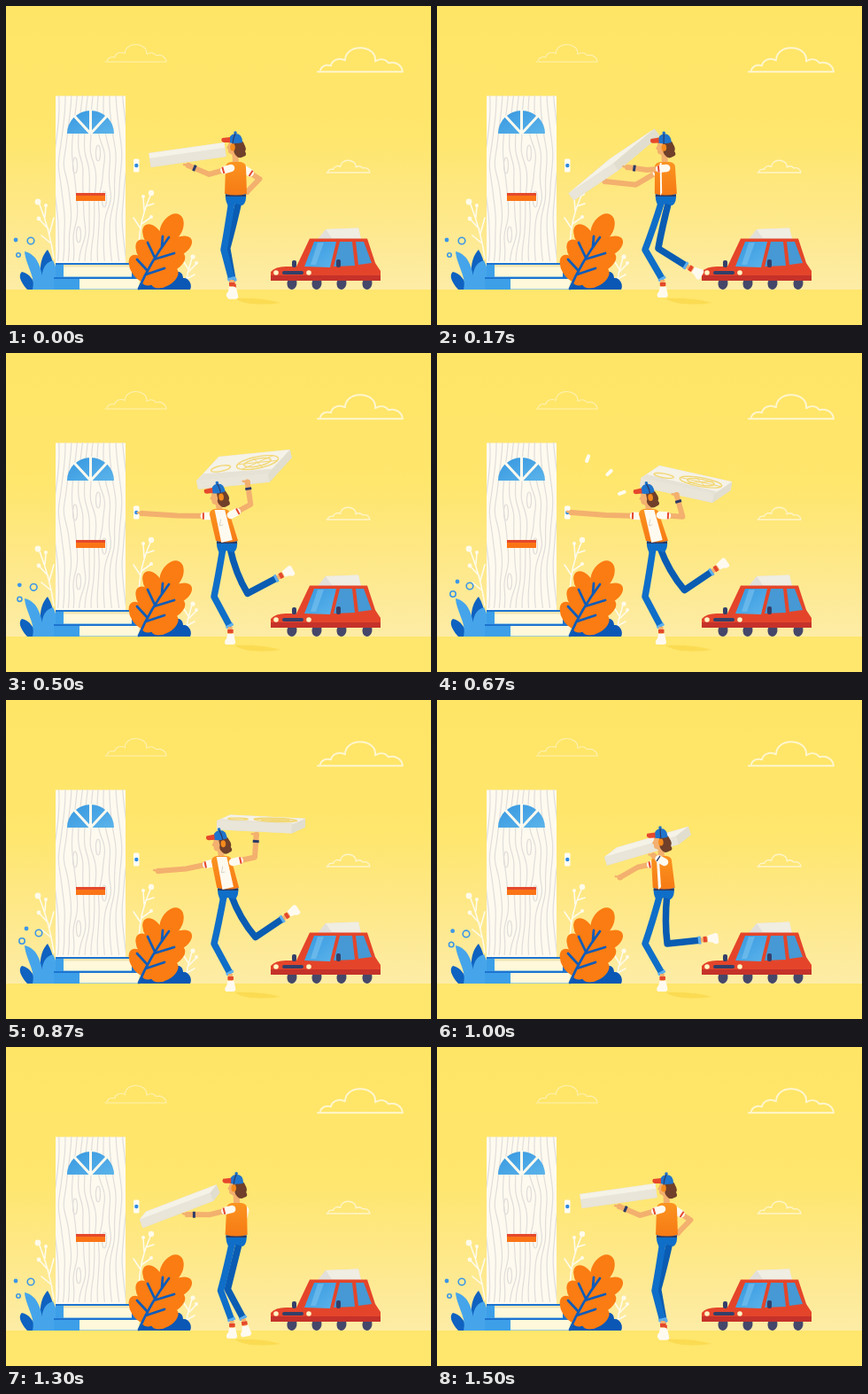
An HTML page that plays this animation: 480x360 px, repeating every 1.53 s.

```html
<!DOCTYPE html>
<html>
<head>
<meta charset="utf-8">
<title>Pizza delivery</title>
<style>
html, body { margin: 0; width: 100%; height: 100%; overflow: hidden; background: #ffe566; }
svg { display: block; width: 480px; height: 360px; }
</style>
</head>
<body>
<svg viewBox="0 0 480 360" xmlns="http://www.w3.org/2000/svg">
  <defs>
    <linearGradient id="sky" x1="0" y1="0" x2="0" y2="1">
      <stop offset="0" stop-color="#ffe566"/>
      <stop offset=".45" stop-color="#ffe66c"/>
      <stop offset=".72" stop-color="#fee887"/>
      <stop offset="1" stop-color="#fdeca6"/>
    </linearGradient>
    <linearGradient id="glass" x1="0" y1="0" x2="1" y2="1">
      <stop offset="0" stop-color="#3697e0"/>
      <stop offset="1" stop-color="#5cb4ea"/>
    </linearGradient>
    <linearGradient id="vest" x1="0" y1="0" x2="0" y2="1">
      <stop offset="0" stop-color="#fb9420"/>
      <stop offset="1" stop-color="#f67a14"/>
    </linearGradient>
    <clipPath id="panel"><rect x="56" y="101" width="79" height="189"/></clipPath>
    <path id="cloud" d="M0 0H96C95 -8 88 -12 80 -10C76 -15 70 -15 65 -12C66 -22 57 -27 48 -27C38 -27 31 -21 31 -13C24 -17 16 -13 15 -7C9 -9 4 -6 3 -2"
      fill="none" stroke="#fff8d8" stroke-linecap="round" stroke-linejoin="round" vector-effect="non-scaling-stroke"/>
  </defs>

  <rect width="480" height="321" fill="url(#sky)"/>
  <rect y="320" width="480" height="40" fill="#ffe66c"/>
  <use href="#cloud" transform="translate(112 63) scale(.72)" stroke-width="1.1" opacity=".65"/>
  <use href="#cloud" transform="translate(352 74.300)" stroke-width="2" opacity=".9"/>
  <use href="#cloud" transform="translate(362 188) scale(.51)" stroke-width="1.3" opacity=".85"/>

  <!-- twigs -->
  <g stroke="#fffbea" stroke-width="1.6" fill="none" stroke-linecap="round">
    <path d="M54 285Q50 255 38 224M48 252L38 241M49 257L54 239M44 238L45 226M51 268L40 259"/>
    <path d="M150 270Q151 240 163 214M153 246L163 239M152 251L144 239M156 231L155 216M158 226L167 223"/>
    <path d="M202 318Q205 300 210 284M205 301L215 291M206 297L201 289M204 308L213 303"/>
  </g>
  <g fill="#fffbea">
    <circle cx="36" cy="221" r="3.4"/><circle cx="45" cy="225" r="2"/><circle cx="37" cy="240" r="2.4"/>
    <circle cx="164" cy="211" r="3.2"/><circle cx="155" cy="215" r="2"/><circle cx="164" cy="238" r="2"/>
    <circle cx="211" cy="283" r="2.6"/><circle cx="215" cy="290" r="2"/>
  </g>

  <!-- door -->
  <rect x="56" y="101.500" width="79" height="189" fill="#fefaef"/>
  <g id="grain" clip-path="url(#panel)" fill="none" stroke="#e0dddb" stroke-width="1.2"/>
  <path d="M69 144a26.500 26 0 0 1 53 0z" fill="url(#glass)"/>
  <path d="M95.500 144L77 124M95.500 144V117M95.500 144L114 124" stroke="#fefaef" stroke-width="3"/>
  <rect x="79" y="211" width="33" height="9" fill="#fb7416"/>
  <rect x="79" y="211" width="33" height="3" fill="#e5482c"/>
  <rect x="144" y="172.500" width="6.500" height="15" rx="1.500" fill="#fffdf4"/>
  <circle cx="147.300" cy="180" r="2.200" fill="#2f8be2"/>

  <!-- shrubs and steps -->
  <path d="M150 320C152 308 180 298 186 305C192 296 200 300 200 307C206 306 211 314 208 320z" fill="#0b57b5"/>
  <path d="M24 320C15 310 14 303 18 300C27 302 31 309 35 320zM44 320C35 300 39 283 47 275C55 288 56 304 52 320z" fill="#0f62c0"/>
  <path d="M30 320C34 306 22 292 21 277C36 280 42 298 42 320zM42 320C38 300 43 290 53 287C60 300 58 312 54 320z" fill="#46a5ea"/>
  <path d="M56 290H150V306H56zM54 306H150V320H54z" fill="#3d9fe8"/>
  <path d="M56 290H150V292H56zM142 292H150V306H142zM54 306H150V308H54z" fill="#1d74d0"/>
  <path d="M65 292H142V305.500H65zM83 308H150V319.500H83z" fill="#fff8da"/>
  <path d="M65 292H142V294.500H65z" fill="#f3e6b4"/>
  <g id="bush" fill="#fa7c12"/>
  <path d="M150 319Q163 289 184 261M160 299L148 286M158 303L179 296M168 284L160 267M167 286L190 279M176 272L177 260" fill="none" stroke="#0f5cb8" stroke-width="2.800" stroke-linecap="round"/>

  <!-- car -->
  <path d="M352 263L361 252L398 250.500L401 263z" fill="#e2dfda"/>
  <path d="M361 252L398 250.500L401 263L368 262z" fill="#f0ede3"/>
  <g id="wheels" fill="#45476a"/>
  <path d="M328 294L343 262.500H408L417 290L423 299V310H299V300Q304 294 316 294z" fill="#e4452a"/>
  <path d="M299 304H423V310H299z" fill="#c5322a"/>
  <path d="M337 294L348 266H373L366 295z" fill="url(#glass)"/>
  <path d="M370 294L377 266H391L394 293zM395 266H404L413 290L398 292z" fill="#4699d4"/>
  <path d="M352 267L344 292H350L359 267z" fill="#7cc3ee" opacity=".6"/>
  <rect x="323" y="287" width="5" height="8" rx="2" fill="#33406a"/>
  <rect x="373" y="286" width="5" height="9" rx="2" fill="#33406a"/>
  <rect x="312" y="299" width="24" height="4" rx="2" fill="#33406a"/>
  <circle cx="305" cy="301" r="2.800" fill="#fff4c4"/><circle cx="342" cy="301" r="2.800" fill="#fff4c4"/>

  <g id="bubbles"/>
  <path d="M258 330Q290 329 310 335Q280 339 264 333z" fill="#f9d94c" opacity=".8"/>
  <g id="rings" stroke="#fffdf0" stroke-width="4" stroke-linecap="round"/>
  <g id="man"/>
</svg>
<script>
const LOOP = 1530;
const TIMES = [0, 170, 370, 670, 870, 1130, 1500, LOOP];
const SKIN = '#f3b06e', WHITE = '#fffaf0', RED = '#e5482c', NAVY = '#2b3b66';
const $ = id => document.getElementById(id);

// one value per key time; each track returns to its first value
const TRACKS = {
  kick: [0, .42, .85, 1, 1, .42],
  turn: [0, .4, 1, 1, 1, 0],
  lean: [0, .1, .75, 1, .8, -.1],
  handX: [272, 190, 157, 152, 172, 240],
  handY: [210, 198, 183, 180, 193, 205],
  bend: [16, 11, 1, 1, 2, -9],
  boxX: [205, 200, 254, 281, 288, 189],
  boxY: [168, 179, 120, 148, 140, 189],
  roll: [-8, -37, -30, 10, 2, -32],
  yaw: [0, 45, 30, 12, 10, 12],
  pitch: [4, 3, 17, 12, 5, 4]
};

// monotone cubic through the keys
function sample(keys, t) {
  const v = [...keys, keys[0], keys[0]], last = TIMES.length - 1;
  let i = 0;
  while (i < last - 1 && t >= TIMES[i + 1]) i++;
  const slope = k => k < 0 || k >= last ? 0 : (v[k + 1] - v[k]) / (TIMES[k + 1] - TIMES[k]);
  const tangent = k => {
    const a = slope(k - 1), b = slope(k);
    return a * b <= 0 ? 0 : 2 * a * b / (a + b);
  };
  const h = TIMES[i + 1] - TIMES[i], p = (t - TIMES[i]) / h, q = 1 - p;
  return v[i] * q * q * (1 + 2 * p) + v[i + 1] * p * p * (3 - 2 * p)
    + h * p * q * (q * tangent(i) - p * tangent(i + 1));
}

const rad = deg => deg * Math.PI / 180;
const ease = (a, b, t) => {
  const p = Math.min(1, Math.max(0, (t - a) / (b - a)));
  return p * p * (3 - 2 * p);
};
const lerp = (a, b, p) => a + (b - a) * p;
const mix = (a, b, p) => [lerp(a[0], b[0], p), lerp(a[1], b[1], p)];
const add = (a, b) => [a[0] + b[0], a[1] + b[1]];
const dist = (a, b) => Math.hypot(b[0] - a[0], b[1] - a[1]) || 1;
const toward = (a, b, d) => mix(a, b, Math.min(1, d / dist(a, b)));
const polar = (p, deg, r) => add(p, [r * Math.sin(rad(deg)), r * Math.cos(rad(deg))]);
const spin = ([x, y], deg) => {
  const c = Math.cos(rad(deg)), s = Math.sin(rad(deg));
  return [x * c - y * s, x * s + y * c];
};

const str = pts => pts.map(p => p[0].toFixed(2) + ',' + p[1].toFixed(2)).join(' ');
const poly = (pts, fill, extra = '') => `<polygon points="${str(pts)}" fill="${fill}" ${extra}/>`;
const line = (pts, color, w, cap = 'round') =>
  `<polyline points="${str(pts)}" fill="none" stroke="${color}" stroke-width="${w}" stroke-linecap="${cap}" stroke-linejoin="round"/>`;
const dot = (p, r, fill, extra = '') => `<circle cx="${p[0]}" cy="${p[1]}" r="${r}" fill="${fill}" ${extra}/>`;

function arm(s, h, bend, watch) {
  const d = dist(s, h);
  const e = add(mix(s, h, .5), [(h[1] - s[1]) / d * bend, (s[0] - h[0]) / d * bend]);
  const cuff = toward(s, e, 8);
  return line([s, e, h], SKIN, 6) + dot(h, 3.2, SKIN)
    + line([h, add(h, [-5, -1])], SKIN, 2.4)
    + line([s, cuff], WHITE, 8.5) + line([cuff, toward(s, e, 10)], RED, 7.5, 'butt')
    + (watch ? line([toward(h, e, 6), toward(h, e, 9)], NAVY, 7, 'butt') : '');
}

function leg(hip, knee, ankle, bow, turn, color) {
  const c = add(mix(hip, knee, .5), [bow, 3]);
  return `<path d="M${hip}Q${c} ${knee}L${ankle}" fill="none" stroke="${color}" stroke-width="7.500" stroke-linejoin="round"/>`
    + line([toward(ankle, knee, 3), ankle], '#5fb0ee', 9, 'butt')
    + `<g transform="translate(${ankle}) rotate(${turn})">
      <rect x="-2.500" width="5" height="9" fill="${SKIN}"/>
      <rect x="-3" y="3" width="6.500" height="4" fill="${RED}"/>
      <path d="M-3 8H4L6 17Q6 20 3 20H-5Q-8 17 -4 13z" fill="${WHITE}"/></g>`;
}

// square slab in space, seen from the side
function box(k) {
  const side = 86, tall = 10;
  const at = (u, v, y = tall / 2) => {
    const [x, z] = spin([(u - .5) * side, (.5 - v) * side], k.yaw);
    const flat = [x, z * Math.sin(rad(k.pitch)) - y * Math.cos(rad(k.pitch))];
    return add([k.boxX, k.boxY], spin(flat, k.roll));
  };
  const corners = [[0, 0], [0, 1], [1, 1], [1, 0]];
  const top = corners.map(c => at(...c)), low = corners.map(c => at(...c, -tall / 2));
  const oval = (u, v, r) => Array.from({length: 28}, (_, i) =>
    at(u + r * Math.cos(i * Math.PI / 14), v + r * Math.sin(i * Math.PI / 14)));
  const wall = (i, j, fill) => poly([top[i], top[j], low[j], low[i]], fill);
  let out = poly(low, '#dcd8c8') + wall(0, 1, '#dedaca') + wall(1, 2, '#dedaca')
    + wall(2, 3, '#e2decf') + wall(3, 0, '#e9e5d8') + poly(top, '#f5f2e8');
  const ink = ease(.5, 1, k.turn);
  if (ink) {
    out += poly([at(0, 0), at(0, .3), at(1, .2), at(1, 0)], '#e6e2d6');
    const paint = `stroke="#f2d774" stroke-width="1.4"`;
    out += `<g opacity="${ink}">` + poly(oval(.68, .56, .28), 'none', paint)
      + poly(oval(.68, .56, .18), 'none', paint) + poly(oval(.2, .45, .13), 'none', paint);
    for (let a = 0; a < 3; a++) {
      const [x, y] = spin([.28, 0], a * 60);
      out += line([at(.68 - x, .56 - y), at(.68 + x, .56 + y)], '#f2d774', 1);
    }
    out += '</g>';
  }
  return out;
}

function head(x, y, turn) {
  const ear = -1 + 6 * turn;
  return `<g transform="translate(${x} ${y}) rotate(${-6 * turn})">
    <path d="M-5 -5H5V8L2 13L-3 9Q-7 8 -6 4L-8 2L-6 -1z" fill="${SKIN}"/>
    <path d="M0 -6Q10 -9 12 -2Q15 3 13 6Q16 11 11 12Q6 15 3 11Q-1 7 1 3z" fill="#70402a"/>
    <path d="M-5 -4Q-6 -13 2 -14Q10 -14 10 -4Q2 -2 -5 -4z" fill="#1f74cc"/>
    <path d="M-4 -10L-13 -9Q-15 -5 -11 -4L-4 -4z" fill="${RED}"/>
    <circle cx="2" cy="-15" r="1.800" fill="#1f74cc"/>
    <path d="M2 -14Q${ear} -8 ${ear} 0" fill="none" stroke="${NAVY}" stroke-width="1.200"/>
    <ellipse cx="${ear}" cy="1.500" rx="2.800" ry="4" fill="#f68a1d"/>
  </g>`;
}

function man(t) {
  const k = {};
  for (const name in TRACKS) k[name] = sample(TRACKS[name], t);
  const {kick, turn, lean} = k;
  const sl = 248 - 20 * lean, sr = sl + 23, hl = 247 - 11 * lean, hr = hl + 25;
  const at = p => lerp(sl, sr, p), waist = p => lerp(hl, hr, p);

  const shoulder = [sl + 6 + 18 * turn, 183], free = [sl + 2 + 19 * (1 - turn) ** 2, 184];
  const grip = [-4 - 24 * Math.sin(rad(k.roll)), 11 + 14 * Math.sin(rad(k.pitch))];
  const hand = add([k.boxX, k.boxY], spin(grip, k.roll));
  const half = dist(shoulder, hand) / 2;
  const bend = Math.sqrt(Math.max(0, 25.5 ** 2 - half ** 2)) * (1 - 2 * turn);

  const hip = [hl + 16, 220], knee = polar(hip, -14 + 44 * kick ** 4, 55);
  const shin = 10 + 114 * kick, ankle = polar(knee, shin, 38);
  const standing = [246 - 11 * ease(0, .42, kick), 275];

  const open = .25 + .5 * turn * turn;
  const shirt = turn > .05
    ? poly([[at(.25), 177], [at(open), 177], [waist(open), 211], [waist(.25), 214]], WHITE) : '';
  const zip = turn > .6 ? line([[at(.55), 188], [at(.5), 195], [at(.65), 194]], '#d9d5ca', 1) : '';

  return arm(free, [k.handX, k.handY], k.bend, false)
    + leg(hip, knee, ankle, -4 * kick, -shin * ease(0, .4, kick), '#0a5cb2')
    + leg([hl + 8, 220], standing, [255 - 2 * lean, 309], 0, 0, '#0f6ec8')
    + `<path d="M${hl + 1} 211H${hr - 1}Q${hr} 222 ${hr - 5} 225L${waist(.5)} 223L${hl + 4} 226Q${hl} 219 ${hl + 1} 211z" fill="#0f6ec8"/>`
    + line([[hl + 1, 214], [hr - 1, 214]], NAVY, 2, 'butt')
    + line([[257 - 21 * lean + 2, 166], [at(.5), 180]], SKIN, 7)
    + `<path d="M${sl} 182Q${sl} 177 ${sl + 6} 176H${sr - 6}Q${sr} 177 ${sr} 182L${hr} 212Q${waist(.5)} 215 ${hl} 212z" fill="url(#vest)"/>`
    + shirt + zip
    + box(k)
    + arm(shoulder, hand, bend, true)
    + head(257 - 21 * lean, 158 + 4 * lean, turn);
}

function bubbles(t) {
  const k = ease(400, 650, t) - ease(880, 1140, t);
  const ring = 'stroke="#3c97e6" stroke-width="1.6"';
  return dot([11 + 12 * k, 264 - 6 * k], 2.4, '#3c97e6')
    + dot([28 + 9 * k, 265 - 2 * k], 3.8, 'none', ring)
    + dot([14 + 4 * k, 281 - 9 * k], 2.2 + k, 'none', ring);
}

function rings(t) {
  if (t < 570 || t > 790) return '';
  const p = (t - 570) / 220, far = 18 + 66 * (1 - (1 - p) ** 2);
  const size = 6 * Math.sin(Math.PI * p);
  return [-70, -44, -20].map(deg =>
    `<path d="M${add([148, 180], spin([far - size / 2, 0], deg))}L${add([148, 180], spin([far + size / 2, 0], deg))}"/>`).join('');
}

function grain() {
  const knots = [[78, 180], [111, 218], [82, 258], [104, 166]];
  let out = '';
  for (let x = 57; x < 136; x += 7) {
    const pts = [];
    for (let y = 100; y <= 291; y += 4) {
      let d = 3 * Math.sin(y / 24 + x / 18);
      for (const [kx, ky] of knots)
        d += Math.sign(x - kx) * 5 * Math.exp(-(((y - ky) / 15) ** 2) - Math.abs(x - kx) / 12);
      pts.push([x + d, y]);
    }
    out += `<polyline points="${str(pts)}"/>`;
  }
  for (const [x, y] of knots) out += `<ellipse cx="${x}" cy="${y}" rx="2.5" ry="9"/>`;
  return out;
}

// lobes in pairs along the stem, plus the tip
function bush() {
  const lobe = (x, y, rx, ry, deg) =>
    `<ellipse rx="${rx}" ry="${ry}" transform="translate(${x} ${y}) rotate(${deg})"/>`;
  let out = lobe(170, 288, 30, 16, -62) + lobe(187, 251, 18, 12, -60);
  for (const p of [.12, .43, .74]) {
    const x = 160 + 25 * p, y = 312 - 56 * p;
    out += lobe(x - 12, y - 9, 17, 10, 58) + lobe(x + 16, y + 1, 17, 10, -30);
  }
  return out;
}

function render(t) {
  $('bubbles').innerHTML = bubbles(t);
  $('rings').innerHTML = rings(t);
  $('man').innerHTML = man(t);
}

$('grain').innerHTML = grain();
$('bush').innerHTML = bush();
$('wheels').innerHTML = [323, 351, 379, 408].map(x =>
  `<ellipse cx="${x}" cy="313" rx="5.5" ry="7" transform="rotate(12 ${x} 313)"/>`).join('');
const start = performance.now();
function tick() {
  render((performance.now() - start) % LOOP);
  requestAnimationFrame(tick);
}
tick();
</script>
</body>
</html>
```
